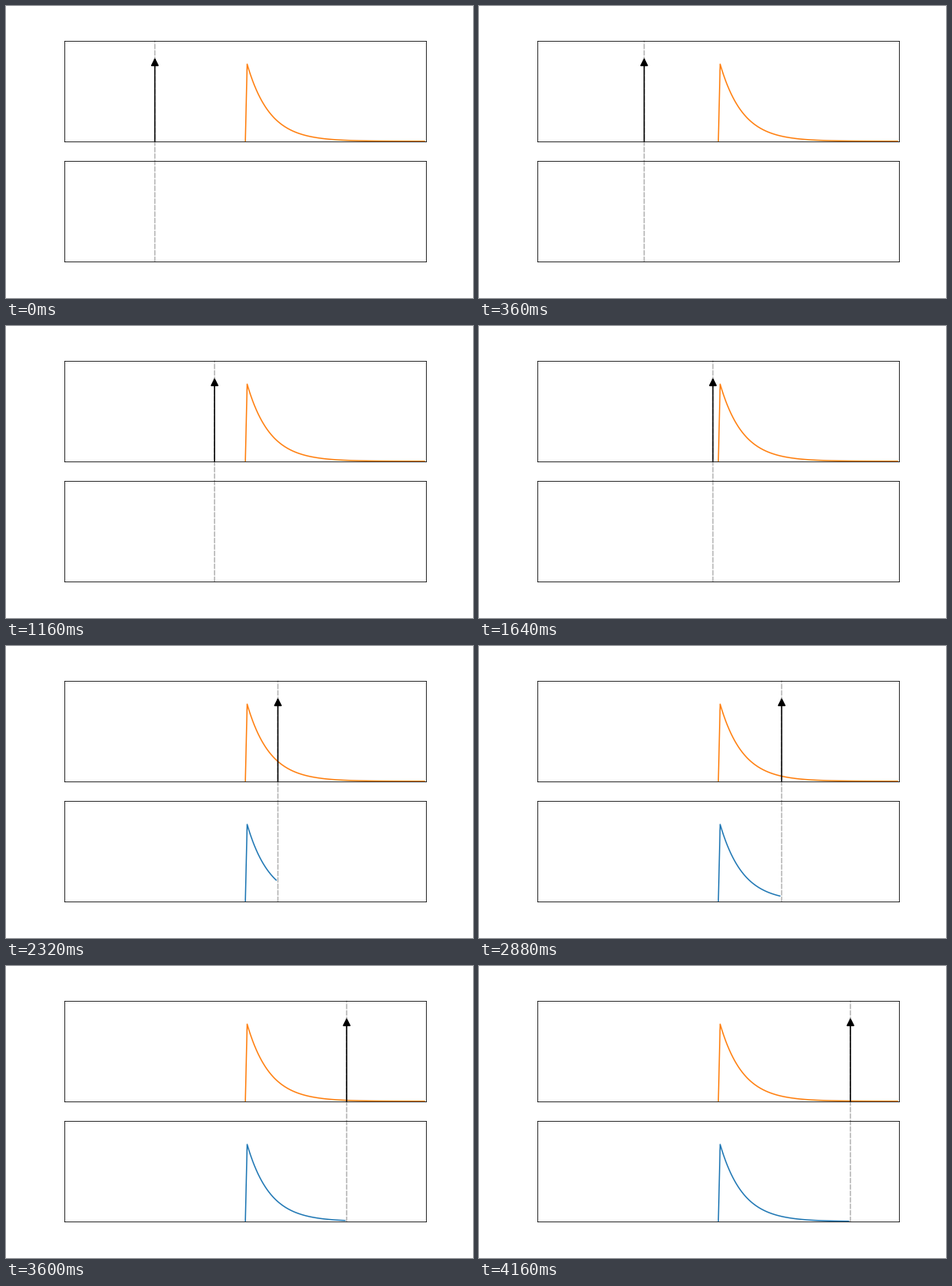
A matplotlib script that plays this animation: 576x360 px, repeating every 4200 ms.

```python
import math

import numpy as np
import matplotlib.pyplot as plt
from matplotlib.animation import FuncAnimation
from matplotlib.patches import ConnectionPatch, FancyArrowPatch

FRAMES, INTERVAL = 105, 40
STEP = 0.02     # spacing of the samples
DECAY = 4

fig, (top, low) = plt.subplots(2, 1, figsize=(8, 5), dpi=72)
fig.subplots_adjust(left=0.125, right=0.9, bottom=0.125, top=0.88, hspace=0.2)
for ax in (top, low):
    ax.set(xlim=(-2, 2), ylim=(0, 1.2), xticks=[], yticks=[])
    ax.patch.set_visible(False)
top.set_zorder(2)

t = np.arange(100) * STEP
response = np.where(t > 0, np.exp(-DECAY * t), 0)
top.plot(t, response, color="tab:orange", lw=1.5)
output, = low.plot([], [], color="tab:blue", lw=1.5)

cursor = ConnectionPatch((-1, 0), (-1, 1.2), "data", "data", axesA=low, axesB=top,
                         arrowstyle="-", ls="--", lw=1.5, color="0.7", zorder=1)
low.add_artist(cursor)
cursor.set_clip_on(False)

impulse = FancyArrowPatch((-1, 0), (-1, 1), arrowstyle="-|>", mutation_scale=20,
                          lw=1.5, color="black", shrinkA=0, shrinkB=0, zorder=4)
top.add_patch(impulse)


def update(i):
    # the cursor steps 30 times a second, shown at 25 frames a second
    n = max(0, math.floor(1.2 * i - 1.3))
    x = -1 + n * STEP
    cursor.xy1, cursor.xy2 = (x, 0), (x, 1.2)
    impulse.set_positions((x, 0), (x, 1))
    seen = max(0, n - 50)
    output.set_data(t[:seen], response[:seen])
    return cursor, impulse, output


anim = FuncAnimation(fig, update, frames=FRAMES, interval=INTERVAL,
                     repeat=True, repeat_delay=0)
plt.show()
```
